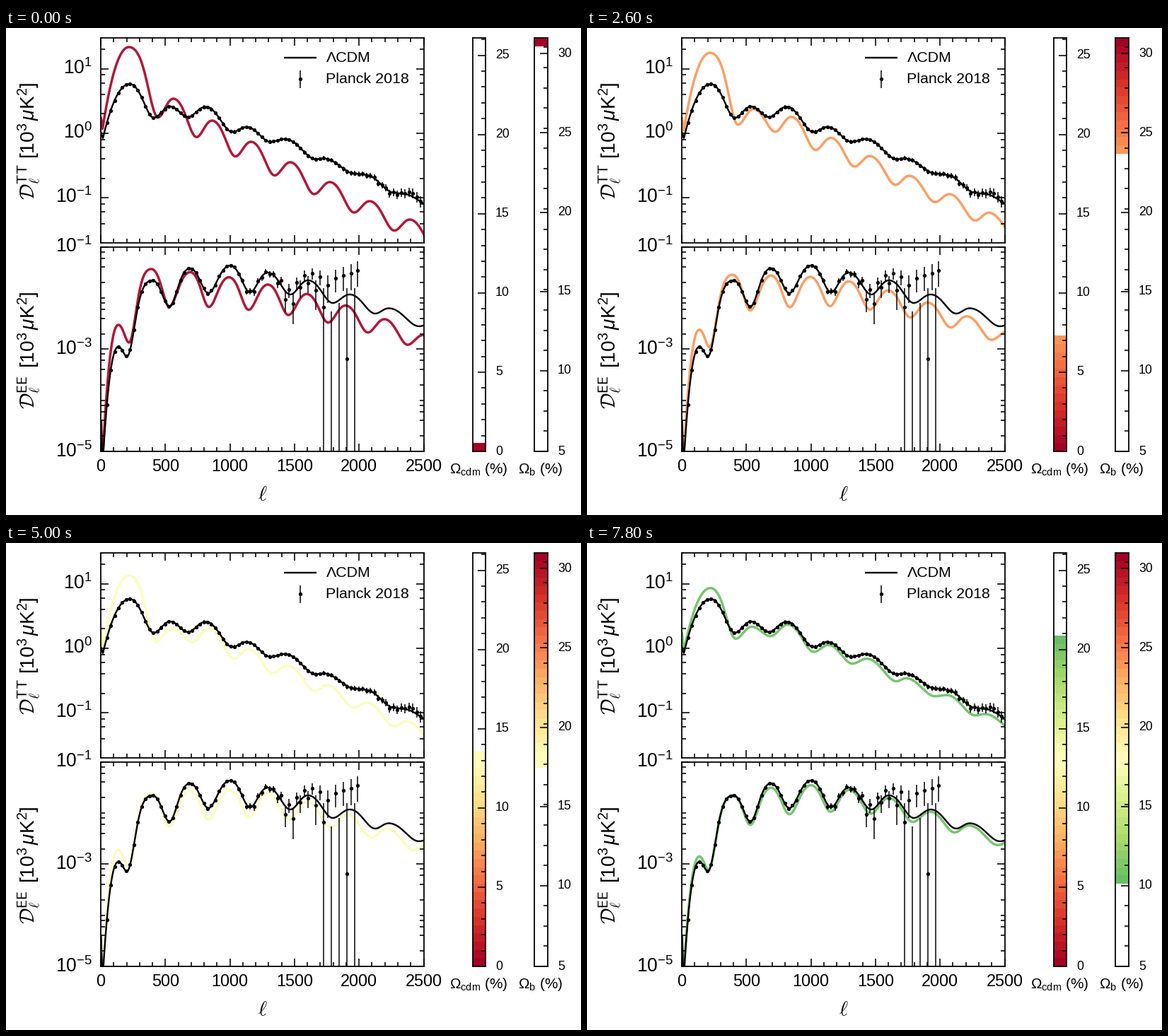
These frames come from a looping animation (813x689 px, 8 s). A matplotlib script:

```python
import numpy as np
import matplotlib as mpl
import matplotlib.pyplot as plt
from matplotlib.animation import FuncAnimation
from matplotlib.ticker import AutoMinorLocator

W, H, DPI = 813, 689, 64
PT = 72 / DPI  # points per pixel
STEPS, SHOWN = 50, 40

sans = "Liberation Sans"
mpl.rcParams.update({
    "font.family": sans, "mathtext.fontset": "custom",
    "mathtext.rm": sans, "mathtext.sf": sans, "mathtext.tt": sans,
    "mathtext.it": sans + ":italic", "mathtext.cal": sans + ":italic",
    "mathtext.bf": sans + ":bold", "axes.linewidth": 1.8 * PT,
})

fig = plt.figure(figsize=(W / DPI, H / DPI), dpi=DPI, facecolor="white")

# Pixel-space layer that holds curves, points and text.
stage = fig.add_axes([0, 0, 1, 1], zorder=-1)
stage.set(xlim=(0, W), ylim=(H, 0))
stage.axis("off")


def box(x0, y0, x1, y1):
    ax = fig.add_axes([x0 / W, 1 - y1 / H, (x1 - x0) / W, (y1 - y0) / H])
    ax.patch.set_facecolor("none")
    return ax


def style_ticks(ax, **sides):
    hidden = dict(labelleft=False, labelright=False, labelbottom=False)
    for which, length in (("major", 11), ("minor", 6)):
        ax.tick_params(which=which, direction="in", length=length * PT,
                       width=1.6 * PT, **hidden, **sides)


def label(x, y, text, size, ha="center", va="center", **kw):
    return stage.text(x, y, text, fontsize=size * PT, ha=ha, va=va, **kw)


# ---- spectra panels -------------------------------------------------------
X0, X1 = 134, 590.5
TT_DECADE, EE_DECADE = 91.15, 72.5


def panel(y0, y1, low, high, major):
    ax = box(X0, y0, X1, y1)
    ax.set(xlim=(0, 2500), yscale="log", ylim=(low, high))
    ax.set_xticks(range(0, 2501, 500))
    ax.set_xticks(range(0, 2501, 100), minor=True)
    ax.set_yticks(major)
    minor = np.outer(10.0**np.arange(-5, 2), [1, 2, 4, 6, 8]).ravel()
    ax.set_yticks(minor[(minor > low) & (minor < high)], minor=True)
    style_ticks(ax, top=True, right=True)
    return ax


tt_ax = panel(14, 304, 0.02, 30, [0.1, 1, 10])
ee_ax = panel(309.6, 599, 1e-5, 1e-1, [1e-5, 1e-3, 1e-1])


def curve(knots, decade, power, spike):
    """Half-cosine swings between extrema, with sharper troughs."""
    kx, ky = np.asarray(knots, float).T
    x = np.linspace(X0 + 0.4, X1, 900)
    i = np.clip(np.searchsorted(kx, x) - 1, 0, len(kx) - 2)
    u = np.clip((x - kx[i]) / (kx[i + 1] - kx[i]), 0, 1)
    u = np.where(ky[i] < ky[i + 1], u, 1 - u)
    drop = np.abs(ky[i + 1] - ky[i])
    u = u - 0.36 * drop / decade * np.sin(np.pi * u) / np.pi
    y = np.minimum(ky[i], ky[i + 1]) + drop * (1 - np.cos(np.pi * u)) / 2
    rise = np.abs((kx[1] - x) / (kx[1] - kx[0]))**power
    y = np.where(x < kx[1], ky[1] + (ky[0] - ky[1]) * rise, y)
    start = np.interp(x, [X0 + 0.4, kx[0]], [spike, ky[0]])
    return x, np.where(x < kx[0], start, y)


def tt_curve(knots, spike=128):
    return curve(knots, TT_DECADE, 2.1, spike)


def ee_curve(knots):
    return curve(knots, EE_DECADE, 2.25, 556)


def ripple(head, odd, even):
    """Alternate two families of extrema, each a quadratic (x, y) in n."""
    n = np.arange(8)
    pairs = [np.stack([a + b * n + c * n**2 for a, b, c in family], 1)
             for family in (odd, even)]
    return np.vstack([head, np.hstack(pairs).reshape(-1, 2)[:-1]])


# Extrema of the fitted spectra, in pixels.
TT_FIT = np.array([
    (137, 156), (175, 79.3), (209, 127), (232, 111), (257, 126), (282, 111.5),
    (320, 147), (340, 140), (374, 161), (394, 157), (438, 185.5),
    (449, 184.5), (492, 205.5), (507, 207.5), (549, 233), (560, 234.5),
    (606, 254)])
EE_FIT = np.array([
    (136.4, 620), (159, 451), (171, 464.5), (207, 357), (231, 394),
    (260, 340), (286, 375), (317, 336), (345, 374), (370, 346), (402, 377),
    (427, 357), (462, 389), (486, 377), (522, 404), (541, 396.5), (584, 422),
    (610, 414)])

# The model starts from evenly spaced waves and ends on the fit.
TT_START = ripple([(136.5, 143), (174, 27)],
                  [(215, 54.2, 0.25), (126.5, 28, -0.22)],
                  [(236.5, 54.5, 0.2), (100, 31.5, -0.5)])
EE_START = ripple([(136, 620), (159, 420), (174, 445)],
                  [(205.5, 54.9, 0), (341, 2.83, 1.5)],
                  [(230.7, 56.2, 0), (394, -1, 1.67)])

# Vertical detour of each extremum halfway through.
TT_SAG = np.zeros(len(TT_FIT))
TT_SAG[1:4] = -7.5, 13, 15
EE_SAG = 8 * np.sin(np.pi * np.clip(np.arange(len(EE_FIT)) - 1.5, -0.5, 7) / 7)


def blend(start, end, sag, k):
    s = (k - 1) / (STEPS - 1)
    knots = start + (end - start) * s
    knots[:, 1] += sag * 4 * s * (1 - s)
    return knots


def draw(ax, xy, color, width, **kw):
    line, = stage.plot(*xy, color=color, lw=width * PT, **kw)
    line.set_clip_path(ax.patch)
    return line


tt_line = draw(tt_ax, ([], []), "k", 3.5, alpha=0.9, zorder=2)
ee_line = draw(ee_ax, ([], []), "k", 3.5, alpha=0.9, zorder=2)
tt_fit = tt_curve(TT_FIT, 148)
ee_fit = ee_curve(EE_FIT)
draw(tt_ax, tt_fit, "k", 2.4, zorder=3)
draw(ee_ax, ee_fit, "k", 2.4, zorder=3)


# ---- measured points ------------------------------------------------------
def points(ax, x, y, top, bottom):
    bars = stage.vlines(x, top, bottom, color="k", lw=1.5 * PT, zorder=4)
    dots, = stage.plot(x, y, "o", color="k", ms=5.3 * PT, mew=0, zorder=5)
    for art in (bars, dots):
        art.set_clip_path(ax.patch)


def to_x(ell):
    return X0 + ell * (X1 - X0) / 2500


def to_power(y):
    return 10**(-1 - (y - 309) / EE_DECADE)


def to_y(power):
    return 309 - EE_DECADE * (np.log10(np.maximum(power, 1e-6)) + 1)


rng = np.random.default_rng(4)

ell = 47 + 30.0 * np.arange(82)
x = to_x(ell)
err = 2.5 + 6 * (ell / 2477)**7
y = np.interp(x, *tt_fit) + rng.normal(0, 0.5, x.size) * (err - 2.2)
points(tt_ax, x, y, y - 0.9 * err, y + err)

# Noise outgrows the signal at small scales and alternates in sign.
i = np.arange(66)
ell = np.minimum(47 + 30.0 * i, 1990)
x = to_x(ell)
fit = to_power(np.interp(x, *ee_fit))
noise = 0.0054 * (ell / 1580)**5
power = fit - (-1.0)**i * noise * rng.uniform(0.3, 1.5, i.size)
sigma = noise + 0.06 * fit
points(ee_ax, x, to_y(power), to_y(power + sigma), to_y(power - sigma))

# ---- colour gauges --------------------------------------------------------
RANGE = 26.1
cmap = plt.get_cmap("RdYlGn")
colors = [cmap(j / (STEPS - 1)) for j in range(STEPS)]
cell = RANGE / STEPS


def gauge(x0, x1, low, bottoms, text_x):
    ax = box(x0, 14, x1, 599)
    ax.set(xlim=(0, 1), ylim=(low, low + RANGE), xticks=[])
    ticks = [low] + [t for t in range(5, 31, 5) if low + 1 < t < low + RANGE]
    ax.set_yticks(ticks)
    ax.yaxis.set_minor_locator(AutoMinorLocator())
    style_ticks(ax, left=False, right=True)
    for t in ticks:
        label(text_x, 599 - (t - low) * 585 / RANGE, f"{t:.0f}", 17.6,
              ha="left")
    return ax.bar(0.5, cell, width=1, bottom=bottoms, color=colors,
                  antialiased=False, zorder=0.5).patches


n = np.arange(STEPS)
cdm = gauge(660, 678, 0, n * cell, 692)
baryon = gauge(747, 766, 4.9, 31 - (n + 1) * cell, 780)
label(668, 624, r"$\Omega_{\mathrm{cdm}}$ (%)", 20.7)
label(756, 624, r"$\Omega_{\mathrm{b}}$ (%)", 20.7)

# ---- axis text and legend -------------------------------------------------
for v in range(0, 2501, 500):
    label(to_x(v), 621, str(v), 23.5)
for e, y in ((1, 57), (0, 148.5), (-1, 239.5), (-1, 309), (-3, 454), (-5, 599)):
    label(122, y, rf"$\mathrm{{10^{{{e}}}}}$", 26.5, ha="right")

label(363, 660, r"$\ell$", 29, math_fontfamily="cm")
turned = dict(rotation=90, rotation_mode="anchor", ha="left", va="baseline")
for name, base in (("TT", 243), ("EE", 539)):
    label(41, base, rf"$\mathcal{{D}}_\ell^{{\mathsf{{{name}}}}}$", 28,
          math_fontfamily="cm", **turned)
    label(41, base - 58, r"[10$^{\mathrm{3}}\,\mu$K$^{\mathrm{2}}$]", 28,
          **turned)

stage.plot([393, 438.5], [42, 42], "k", lw=2.4 * PT, solid_capstyle="butt")
label(453, 42, "ΛCDM", 21.4, ha="left")
points(tt_ax, [416], [72], [59.5], [84.5])
label(452, 72, "Planck 2018", 21.4, ha="left")


def update(frame):
    k = frame + 1
    tt_line.set_data(*tt_curve(blend(TT_START, TT_FIT, TT_SAG, k)))
    ee_line.set_data(*ee_curve(blend(EE_START, EE_FIT, EE_SAG, k)))
    for line in (tt_line, ee_line):
        line.set_color(colors[frame])
    for bars in (cdm, baryon):
        for j, bar in enumerate(bars):
            bar.set_visible(j < k)
    return tt_line, ee_line


anim = FuncAnimation(fig, update, frames=SHOWN, interval=200,
                     init_func=lambda: update(0), repeat=True,
                     repeat_delay=0, blit=False)
plt.show()
```
